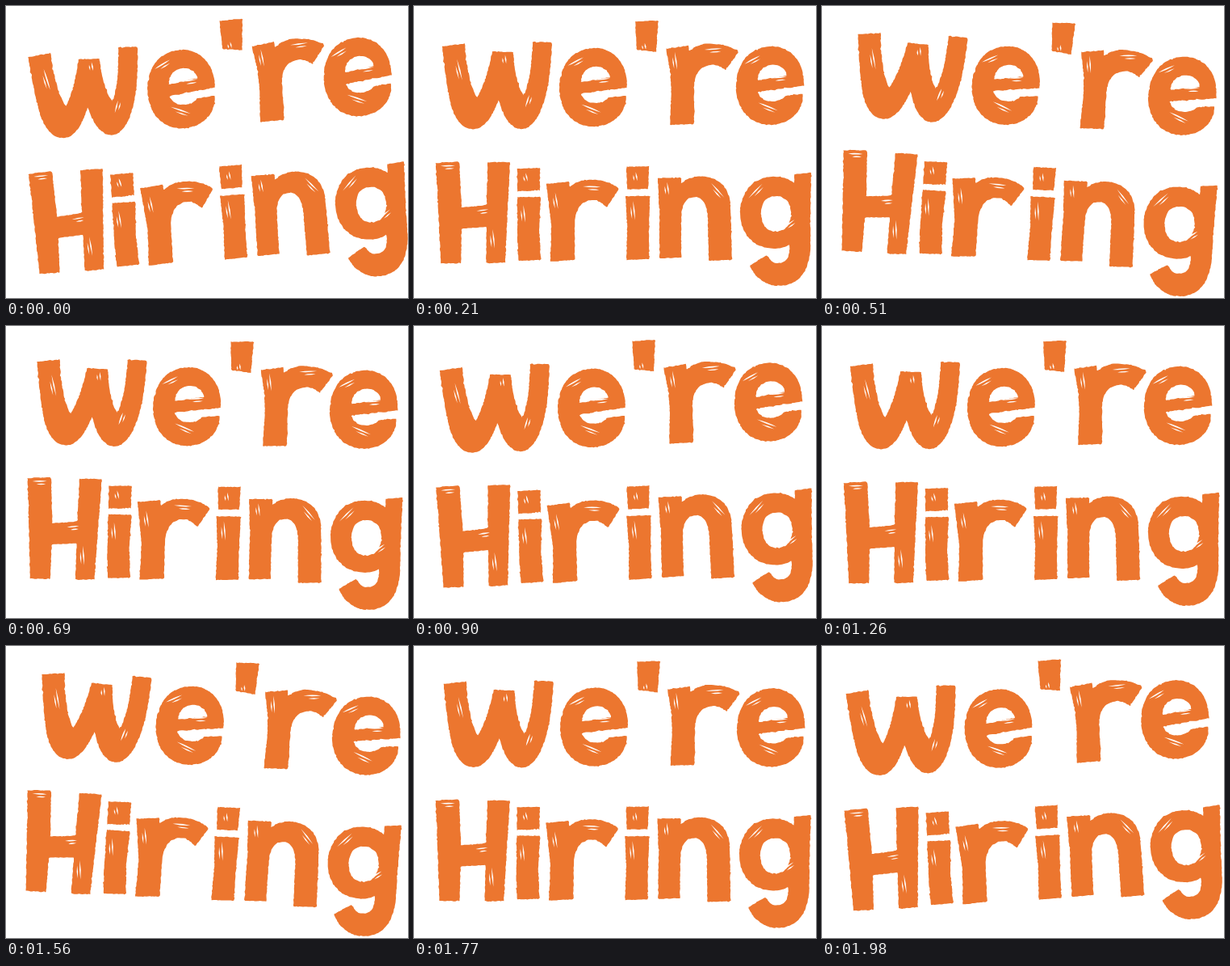
An HTML page for the animation above (2.01 s loop, 498 px wide and 361 px high).

```html
<!DOCTYPE html>
<html lang="en">
<head>
<meta charset="utf-8">
<title>we're Hiring</title>
<style>
html, body { margin: 0; width: 100%; height: 100%; overflow: hidden; background: #fff; }
svg { display: block; width: 498px; height: 361px; }
</style>
</head>
<body>
<svg viewBox="0 0 498 361" role="img" aria-label="we're Hiring">
  <g id="sign">
    <g id="letters" fill="#ec762f" fill-rule="evenodd"></g>
    <g id="scratches" fill="#fff"></g>
  </g>
</svg>
<script>
const LOOP = 2010, STEP = 30;
const PIVOT = [258, 183], SWING = 7.3, REST = 0.467;
// [time in ms, swing position]
const KEYS = [[0, 0], [480, 1.056], [1050, 0], [1530, 1.056], [1980, 0.14]];

const letterE = [
  'M180 102 C180 72 198 52 224 52 C249 52 264 72 264 99 L264 101 L207 108 C209 116 216 120 224 120 C231 120 237 118 241 113 L263 111 C263 134 245 149 222 149 C197 149 180 129 180 102Z',
  'M207 94 C207 82 215 75 226 75 C235 75 241 80 243 88Z'
];
const shapes = {
  w: ['M35 50 L63 46 C64 66 68 96 78 113 C87 99 93 76 97 56 L123 57 C124 78 128 98 136 111 C144 92 146 67 147 44 L171 45 C170 73 167 103 159 124 C152 143 143 152 133 152 C119 152 110 135 105 116 C97 136 88 152 73 152 C56 152 47 133 43 108 C39 88 37 68 35 50Z'],
  e1: letterE,
  quote: ['M274 19 L303 18 L300 57 L276 54Z'],
  r1: ['M312 53 L340 49 L341 56 C350 48 359 46 370 47 C383 47 394 50 402 57 L386 80 C379 74 373 72 367 73 C353 75 347 86 347 103 L347 146 L317 147 L319 105 L317 78Z'],
  e2: letterE,
  H: ['M27 194 L56 192 L59 249 L90 246 L91 193 L119 193 L116 250 L113 317 L89 318 L90 273 L59 275 L58 318 L33 318 L30 250Z'],
  i1: ['M128 201 L156 200 L156 228 L128 229Z', 'M128 236 L157 236 L155 275 L157 314 L129 315 L128 280Z'],
  r2: ['M164 220 L192 217 L193 224 C201 216 211 214 222 215 C235 215 246 219 254 226 L239 249 C231 242 225 239 219 240 C205 242 199 254 199 270 L199 314 L169 316 L170 270Z'],
  i2: ['M263 199 L291 198 L290 226 L264 227Z', 'M262 235 L292 235 L291 275 L291 313 L263 314 L264 275Z'],
  n: ['M302 213 L331 212 L331 219 C340 212 350 210 359 211 C380 213 391 226 392 248 L394 314 L365 315 L364 265 C364 247 358 236 347 236 C336 237 331 247 331 264 L331 311 L304 312 L304 260Z'],
  g: [
    'M404 256 C404 229 422 211 446 211 C456 211 465 214 471 219 L471 208 L492 206 L491 255 L491 295 C491 327 477 346 452 346 C436 346 423 337 416 321 L437 308 C441 315 446 319 453 318 C463 317 466 308 465 295 C459 299 453 300 446 300 C421 300 404 282 404 256Z',
    'M430 257 C430 243 437 235 448 235 C460 235 467 244 467 257 C467 270 460 279 448 279 C437 279 430 270 430 257Z'
  ]
};
const offsets = { e2: [219, -2] };

// Scratch groups: x, y, length, angle
const eScratches = [[201, 70, 22, -28], [233, 92, 20, -5], [219, 128, 26, 22]];
const scratches = [
  [55, 79, 27, 76], [112, 66, 11, 83], [142, 118, 16, -72],
  [285, 50, 8, 80], [323, 68, 22, 82], [371, 55, 22, -4],
  [42, 199, 18, -2], [85, 254, 15, -7], [97, 288, 24, 84],
  [138, 212, 11, 75], [135, 257, 22, 84], [175, 241, 21, 80], [220, 225, 22, 2],
  [274, 211, 11, 80], [271, 253, 24, 84], [313, 226, 16, 82], [375, 229, 24, 48],
  [424, 230, 25, -46], [465, 271, 18, -36],
  ...eScratches, ...eScratches.map(([x, y, l, a]) => [x + 219, y - 2, l, a])
];

const make = (tag, attrs, parent) => {
  const node = document.createElementNS('http://www.w3.org/2000/svg', tag);
  for (const name in attrs) node.setAttribute(name, attrs[name]);
  return parent.appendChild(node);
};

let seed = 11;
const random = () => (seed = seed * 16807 % 2147483647) / 2147483647;

// Resample an outline with small irregular dents, like a dry brush.
function roughen(d) {
  const probe = document.createElementNS('http://www.w3.org/2000/svg', 'path');
  probe.setAttribute('d', d);
  const total = probe.getTotalLength(), count = Math.round(total / 2);
  let points = [];
  for (let i = 0; i < count; i++) {
    const p = probe.getPointAtLength(i / count * total);
    const size = random() < 0.08 ? 2 : 0.8;
    points.push((p.x + (random() - 0.5) * size).toFixed(1) + ' ' + (p.y + (random() - 0.5) * size).toFixed(1));
  }
  return 'M' + points.join('L') + 'Z';
}

const leaf = (x, y, length, width) =>
  `M${x - length / 2} ${y}Q${x} ${y - width} ${x + length / 2} ${y}Q${x} ${y + width} ${x - length / 2} ${y}Z`;

const letters = document.getElementById('letters');
for (const name in shapes) {
  const [dx, dy] = offsets[name] || [0, 0];
  make('path', { d: shapes[name].map(roughen).join(''), transform: `translate(${dx} ${dy})` }, letters);
}

const scratchLayer = document.getElementById('scratches');
for (const [x, y, length, angle] of scratches) {
  const d = leaf(0, -1.6, length, 1.7) + leaf(length * 0.1, 2, length * 0.65, 1.5);
  make('path', { d, transform: `translate(${x} ${y}) rotate(${angle})` }, scratchLayer);
}

function swingAt(time) {
  let i = 1;
  while (i < KEYS.length - 1 && time > KEYS[i][0]) i++;
  const [t0, v0] = KEYS[i - 1], [t1, v1] = KEYS[i];
  return v0 + (v1 - v0) * (time - t0) / (t1 - t0);
}

const sign = document.getElementById('sign');
function draw(time) {
  const t = Math.floor(time % LOOP / STEP) * STEP;
  const angle = (swingAt(t) - REST) * SWING;
  sign.setAttribute('transform', `rotate(${angle.toFixed(3)} ${PIVOT})`);
}

let start;
function tick(now) {
  start ??= now;
  draw(now - start);
  requestAnimationFrame(tick);
}
draw(0);
requestAnimationFrame(tick);
</script>
</body>
</html>
```
